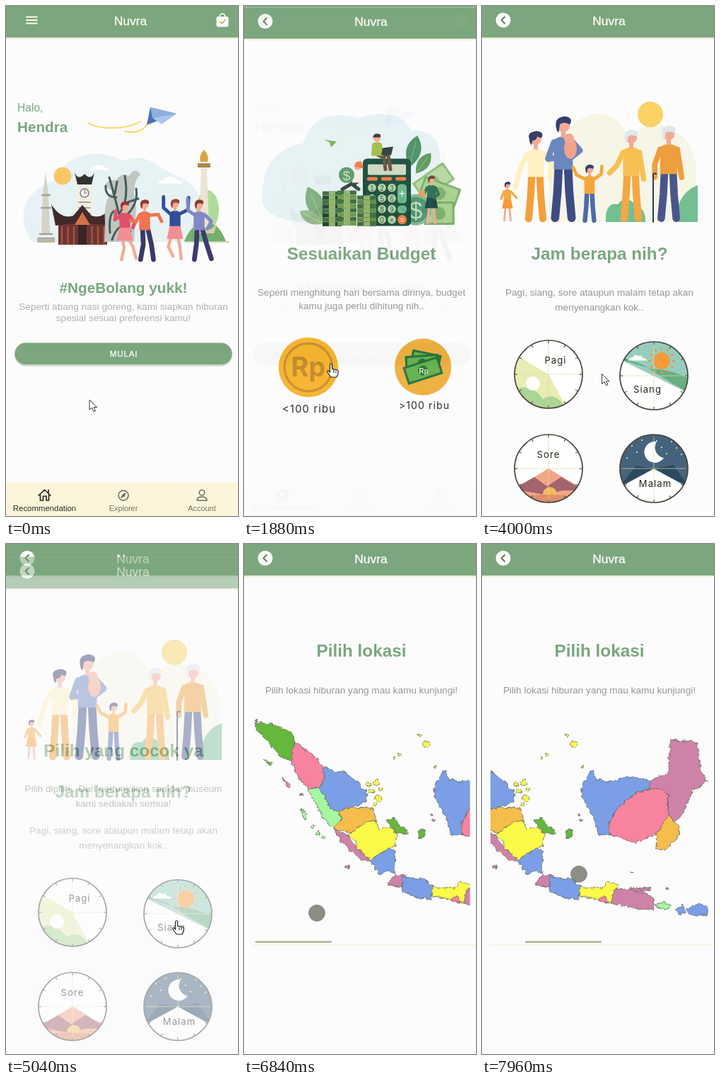
These frames come from a looping animation (328 by 720 pixels, 8 s). An HTML page:

```html
<!DOCTYPE html>
<html lang="id">
<head>
<meta charset="utf-8">
<title>Nuvra</title>
<style>
html, body { margin: 0; height: 100%; overflow: hidden; background: #fcfcfd; }
svg { display: block; width: 100vw; height: 100vh; }
text { font-family: "Liberation Sans", Arial, sans-serif; }
.label { font-family: Inter, sans-serif; font-weight: 400; letter-spacing: 1.1px; }
</style>
</head>
<body>
<svg id="stage" viewBox="0 0 328 720"></svg>
<script>
const LOOP = 8000, SLIDE = 280;
const GREEN = '#7ba67e', MUTED = '#959591', SKIN = '#f3aa94', NAVY = '#38396a', PALE = '#e7f2f4';

// Drawing helpers
const path = (d, fill, more = '') => `<path d="${d}" fill="${fill}" ${more}/>`;
const line = (d, color, w = 1) =>
  `<path d="${d}" fill="none" stroke="${color}" stroke-width="${w}" stroke-linecap="round" stroke-linejoin="round"/>`;
const circ = (x, y, r, fill, more = '') => `<circle cx="${x}" cy="${y}" r="${r}" fill="${fill}" ${more}/>`;
const ell = (x, y, rx, ry, fill) => `<ellipse cx="${x}" cy="${y}" rx="${rx}" ry="${ry}" fill="${fill}"/>`;
const rect = (x, y, w, h, fill, rx = 0) => `<rect x="${x}" y="${y}" width="${w}" height="${h}" rx="${rx}" fill="${fill}"/>`;
const text = (x, y, s, size, fill, more = 'text-anchor="middle"') =>
  `<text x="${x}" y="${y}" font-size="${size}" fill="${fill}" ${more}>${s}</text>`;
const at = (x, y, body, more = '') => `<g transform="translate(${x} ${y}) ${more}">${body}</g>`;
const rough = body => `<g filter="url(#rough)">${body}</g>`;
const repeat = (n, f) => Array.from({ length: n }, (_, i) => f(i)).join('');
const label = (x, y, s, size) => text(x, y, s, size, '#25251c', 'class="label" text-anchor="middle"');
const title = (y, s, size = 24.3) => text(166, y, s, size, GREEN, 'text-anchor="middle" font-weight="700"');
const note = (y, a, b, color = MUTED, gap = 20.5) => text(166, y, a, 13.6, color) + (b ? text(166, y + gap, b, 13.6, color) : '');
const leaf = (x, y, len, angle, fill) =>
  at(x, y, path(`M0 0Q${-len * .45} ${-len * .55} 0 ${-len}Q${len * .45} ${-len * .55} 0 0`, fill)
    + line(`M0 0V${-len * .8}`, '#ffffff60', .8), `rotate(${angle})`);
const cloud = (x, y, s = 1) => at(x, y, path('M-18 5Q-17-1-10-1Q-5-9 2-4Q9-6 11 0Q18 0 19 5Z', '#fff'), `scale(${s})`);
const bill = (x, y, w, h, angle, edge, face) => at(x, y,
  rect(-w / 2, -h / 2, w, h, edge, 1) + rect(-w / 2 + 3, -h / 2 + 3, w - 6, h - 6, face, 2)
  + circ(0, 0, h * .27, edge), `rotate(${angle})`);

// Head is at the origin, feet are 80 units below.
const person = (x, y, s, o) => at(x, y,
  line(o.stance || 'M-4 36L-5 56L-7 78M4 36L5 56L7 78', o.skirt ? SKIN : o.legs, o.skirt ? 4.5 : 7)
  + path('M-8 12Q0 6 8 12L8 37H-8Z', o.top)
  + (o.skirt ? path('M-8 32H8L12 51H-12Z', o.skirt) : '')
  + line(o.arms || 'M-8 14L-13 26L-9 37M8 14L13 26L9 37', o.top, 5)
  + rect(-2, 4, 4, 6, SKIN) + circ(0, 0, 5.5, SKIN) + path('M-5.500 4Q-9-7 1-8Q9-7 5.500-1Q0-4-3-1L-4 6Z', o.hair), `scale(${s})`);

const header = (x, icons) => rect(0, 0, 328, 47, '#f5f1de') + rect(0, 0, 328, 44.5, GREEN)
  + text(x, 26.5, 'Nuvra', 17.4, '#fffdf6', 'text-anchor="middle" stroke="#fffdf6" stroke-width=".3"') + icons;
const backHeader = header(179.5, circ(30, 20, 10.5, '#fdfdf9') + line('M32 15.5L27.5 20L32 24.5', '#5d7b5c', 2));
const page = (id, body) => `<g id="${id}">${rect(0, 0, 328, 760, '#fcfcfd')}${body}</g>`;

const home = () => {
  const art = path('M27 315C18 280 35 258 72 245C82 207 135 200 165 219C200 203 217 232 245 241C280 255 282 300 300 333H36Z', PALE)
    + cloud(232, 246, .9) + cloud(132, 228, .7) + circ(80, 240, 12.5, '#fbc667')
    + path('M56 235L60 265L62 322H50L52 265Z', '#d4d3c6') + line('M51 267h11M50 285h13M48 322h17M46 328h22', '#a3a296', 2.5) + rect(44, 328, 25, 6, '#b9b8a8')
    + rect(99, 250, 24, 62, '#f1eee4') + circ(111, 264, 6, '#fff', 'stroke="#777" stroke-width="1.500"')
    + line('M111 260v4h3M103 277h16M103 285h16M103 293h16', '#8b8b82', 1.5) + path('M97 235Q102 247 111 237Q120 247 125 235L121 252H101Z', '#33342f')
    + path('M74 305H143V337H74Z', '#6b3532') + line(repeat(8, i => `M${79 + i * 8.5} 312v24`), '#a6523c', 2.5)
    + path('M64 280Q78 302 95 296L108 281L121 296Q138 302 151 280L147 310Q108 303 70 310Z', '#43292b') + path('M97 309L108 291L119 309Z', '#d2704a')
    + rect(102, 309, 12, 28, '#3a2425')
    + path('M140 305Q138 270 152 262L140 254Q142 244 156 246Q163 234 174 240Q182 226 190 238Q176 250 184 285L181 333H139Z', '#c0c7c1')
    + line('M166 320Q157 280 146 242M161 292Q174 275 168 240M163 302Q188 283 184 258M156 270Q140 270 141 254M172 277L187 272M154 265L157 248M147 320Q145 295 152 290M150 330Q160 300 176 318', '#465c5c', 3)
    + ell(285, 288, 16, 28, '#b0dc9b') + path('M252 333Q262 306 277 310Q299 299 311 333Z', '#72b06c')
    + path('M276 229H284L287 313H273Z', '#eae4d2') + path('M263 308L271 315H290L298 308L294 321H268Z', '#d8cbb0')
    + rect(271, 222, 18, 6, '#a98850', 1) + path('M275 220Q272 211 280 203Q288 212 285 220Z', '#dda341') + line('M255 333H315', '#c9d2b8', 2)
    + person(168, 283, .94, { hair: '#9c3440', top: '#e2506a', skirt: '#f28e94', arms: 'M-7 14L-15 20L-13 6M7 14L15 25L12 32', stance: 'M-4 46L-1 62L-5 80M4 46L12 60L17 78' })
    + person(196, 281, .96, { hair: '#8e352e', top: '#f0744f', legs: NAVY, arms: 'M-7 14L-13 25L-21 22M8 15L20 14L25 24', stance: 'M-3 36L-2 58L-6 80M5 36L10 58L13 80' })
    + person(239, 280, .96, { hair: '#9c4434', top: '#334d9a', skirt: '#f28e94', arms: 'M-7 14L-17 5L-17-11M7 14L19 8L20-10', stance: 'M-5 46L-10 62L-3 76M4 46L7 62L9 80' })
    + person(273, 281, .96, { hair: '#8b3c33', top: '#8089c6', legs: '#3d3b70', arms: 'M-7 14L-16 8L-17-9M8 14L18 24L12 35', stance: 'M-3 36L-4 58L-7 80M5 36L11 57L18 79' });
  const plane = line('M116 165C130 174 168 176 190 163M168 177Q190 181 199 168', '#f7d567', 2)
    + path('M204 143L241 152L199 168Z', '#4d70b0') + path('M204 143L241 152L207 158Z', '#8db0e0') + path('M207 158L241 152L220 167Z', '#a9c6ec');
  const tabs = rect(0, 672.5, 328, 88, '#fdf5da')
    + line('M46 691L54.5 683L63 691M48.500 690V698H52.500V692H57V698H60.500V690M60 687v-4', '#292926', 1.7)
    + circ(166, 691, 7, 'none', 'stroke="#6c6a5e" stroke-width="1.500"') + path('M170 687L167.500 692.500L162 695L164.500 689.500Z', '#6c6a5e')
    + circ(277, 687, 3.8, 'none', 'stroke="#6c6a5e" stroke-width="1.500"') + line('M270 698Q270 693 277 693Q284 693 284 698Z', '#6c6a5e', 1.5)
    + text(54.5, 713, 'Recommendation', 11.4, '#292926') + text(166, 713, 'Explorer', 10.9, '#737064') + text(277, 713, 'Account', 10.9, '#737064');
  return page('home', header(176, line('M29 15.500H44M29 20H44M29 24.500H44', '#fffae6', 1.8)
      + rect(297.5, 15, 17, 14.5, '#fffef8', 2) + line('M302 16Q302 11 306 11Q310 11 310 16', '#fffef8', 1.6) + line('M302.500 22L305 24.500L310 19.500', '#c2a86a', 1.6))
    + text(16, 149, 'Halo,', 15.6, GREEN, '') + text(16, 178, 'Hendra', 20.7, GREEN, 'font-weight="700"')
    + plane + art + title(405, '#NgeBolang yukk!', 20.75)
    + note(429, 'Seperti abang nasi goreng, kami siapkan hiburan', 'spesial sesuai preferensi kamu!', '#b1b2ab', 15.5)
    + rect(12, 476, 308, 32.5, '#cfd3c6', 16) + rect(12.5, 475.5, 307, 30.5, GREEN, 15.3)
    + text(166.5, 495, 'MULAI', 11.6, '#fffdf4', 'text-anchor="middle" letter-spacing=".8" stroke="#fffdf4" stroke-width=".3"') + tabs);
};

const budget = () => {
  const keys = ['123', '456', '789', '0×'];
  const pad = keys.map((row, r) => [...row].map((k, c) => circ(181 + c * 14 + (r > 2 ? 14 : 0), 255 + r * 15, 5.8, '#b5d3a8')
    + text(181 + c * 14 + (r > 2 ? 14 : 0), 259 + r * 15, k, 10, '#245c4a')).join('')).join('');
  const stack = (x, y, n, color) => repeat(n, i => rect(x, y + i * 6.2, 27, 5.9, i % 2 ? color : '#3c7041') + rect(x + 9, y + i * 6.2, 9, 5.9, '#93b56c'));
  const art = path('M75 303Q20 295 26 265C27 220 47 200 84 192C95 150 132 148 162 157C185 148 225 146 236 174C278 175 279 200 276 226L300 303Z', PALE)
    + path('M113 187L131 190L123 198L121 191Z', '#7cae55')
    + leaf(234, 226, 46, 14, '#4c8f63') + leaf(243, 235, 36, 36, '#5c9a5c')
    + leaf(112, 303, 54, -24, '#7fae7d') + leaf(112, 306, 38, -62, '#96bb8e')
    + bill(268, 246, 53, 30, -35, '#8fbf7b', '#b9d8a0') + bill(276, 263, 55, 33, 20, '#79b06d', '#a9d08e') + bill(276, 291, 43, 33, 0, '#79b06d', '#a9d08e')
    + circ(243, 286, 22, '#86b795') + circ(243, 286, 18, '#4f9570') + text(243, 298, '$', 34, '#c4dfbc')
    + rect(168, 214, 68, 95, '#1b4d3c', 6) + rect(175, 222, 54, 15, '#d0d9bf', 2)
    + rect(174, 240, 15, 5, '#f07d46', 2) + rect(194, 240, 15, 5, '#f07d46', 2) + rect(214, 240, 15, 5, '#f07d46', 2) + pad
    + rect(217, 250, 13, 27, '#6bb789', 5) + text(223.5, 268, '+', 16, '#fff') + rect(217, 280, 13, 11, '#6bb789', 5) + circ(223.5, 300, 6.5, '#f07d46') + text(223.5, 304, '=', 11, '#fff')
    + stack(111, 260, 8, '#23462f') + stack(160, 266, 7, '#5d8c48') + stack(132, 259, 8, '#6d9a4c')
    + line('M188 206L204 210L207 229M186 207L198 213L200 229', '#695240', 5) + path('M181 193Q188 188 195 193L197 210H180Z', '#a3bd4a')
    + circ(188, 185, 5, SKIN) + path('M182 184Q184 176 193 180V184Z', '#40362f') + path('M196 199L211 197L208 209H194Z', '#294038')
    + line('M156 246L151 250L139 257M161 246L154 251L162 257', '#394540', 5) + path('M154 229H167V248H153Z', '#f5efe6') + circ(161, 225, 5, SKIN) + path('M156 225Q157 216 166 218L169 228Z', '#f07d46')
    + circ(145, 237, 11, '#5c9a6c') + text(145, 244, '$', 19, '#d1e4bb')
    + person(265, 244, .78, { hair: '#693f3c', top: '#2d6e55', skirt: '#1c4a40', arms: 'M-8 14L-14 26L-18 22M8 14L13 26L4 32' })
    + rect(247, 259, 9, 9, '#e99b58', 1);
  const coin = circ(0, 0, 40, '#f6b32b') + circ(0, 0, 32, 'none', 'stroke="#c98f2a" stroke-width="3"')
    + text(0, 12, 'Rp', 36, '#c48a28', 'text-anchor="middle" font-weight="700" style="font-family:Inter,sans-serif"') + label(1, 61, '&lt;100 ribu', 14);
  const cash = circ(253, 508, 40, '#eeae3c') + bill(257, 497, 42, 20, 12, '#23713a', '#63b04f') + bill(252, 502, 48, 22, -4, '#23713a', '#63b04f') + bill(253, 513, 52, 26, -18, '#23713a', '#63b04f')
    + text(254, 517, 'Rp', 10, '#dcecae', 'text-anchor="middle" font-weight="700"') + label(255, 567.5, '&gt;100 ribu', 14);
  return page('budget', backHeader + art + title(356.5, 'Sesuaikan Budget')
    + note(407, 'Seperti menghitung hari bersama dirinya, budget', 'kamu juga perlu dihitung nih..', MUTED, 19.5)
    + at(91, 508.5, coin, 'scale(1.055)') + cash);
};

const hours = () => {
  const art = path('M96 305C85 215 120 150 168 152Q202 157 206 196C224 148 300 165 303 230V305Z', '#f6f5e6') + circ(238, 153, 18, '#fbd264')
    + path('M175 305Q174 276 192 280Q204 264 219 283Q231 285 231 305ZM273 305Q276 263 305 253V305Z', '#74bf92')
    + person(36, 253, .64, { hair: '#3b3d63', top: '#f5a945', skirt: '#f49c3a', arms: 'M-8 14L-14 30M8 14L20 28' })
    + person(76, 188, 1.44, { hair: '#393d66', top: '#fff0c2', legs: '#f3a03c', arms: 'M-8 14L-15 28L-20 47M8 14L15 25L14 38' }) + circ(72, 184, 6, '#393d66')
    + person(115, 169, 1.67, { hair: '#343e6d', top: '#6c86c0', legs: '#3e4c85', arms: 'M-8 14L-13 28L4 26M8 14L14 21L5 28' })
    + ell(125, 201, 9, 15, '#f2a28a') + circ(123, 187, 7, SKIN)
    + person(152, 231, .92, { hair: '#39416f', top: '#f4a73c', legs: '#5068ab', arms: 'M-8 14L-20 8L-25-3M8 14L18 7L19-5' })
    + person(211, 186, 1.46, { hair: '#dde9ec', top: '#f7c055', legs: '#f4a845', arms: 'M-8 14L-14 27L-21 34M8 14L12 40' })
    + person(264, 181, 1.52, { hair: '#e1e8ec', top: '#ed9f3c', legs: '#48568c', arms: 'M-8 14L-13 28L-13 40M8 14L12 40' }) + line('M242 305V239Q242 235 246 237', '#303a58', 2);
  const clock = (x, y, name, tx, ty, scene) => at(x, y, circ(0, 0, 48, '#fff') + `<g clip-path="url(#dial)">${scene}</g>`
    + line('M-48 0H48M0-48V48', '#dcdca6', .7) + circ(0, 0, 48, 'none', 'stroke="#45453a" stroke-width="1.700"')
    + repeat(12, i => `<path d="M0-48V-44" stroke="#55554a" stroke-width="1.200" transform="rotate(${i * 30})"/>`) + label(tx, ty, name, 13));
  const rays = (x, y) => at(x, y, repeat(12, i => `<path d="M0-15V-19" stroke="#ee9435" stroke-width="2" transform="rotate(${i * 30})"/>`) + circ(0, 0, 12, '#f69a3c'));
  const morning = path('M-50-30L0 0L27 50H-50Z', '#e9edb4') + path('M-50 23Q-25 10-8 35Q10 22 26 50H-50Z', '#abd593') + circ(-22, 13, 10, '#fff');
  const noon = path('M-50-24L50 25V-50H-50Z', '#98cdbd') + path('M-50-24Q-20-22 0-5L50 25V4Q20-10-5-10Z', '#6aae82') + cloud(-23, -25, .7) + rays(11, -21);
  const dusk = path('M-50 30L0 0L50 30V50H-50Z', '#f2a688') + path('M-50 29L-20 12L-2 25L18 12L50 31L20 31L-5 37Z', '#a3646c') + circ(2, 36, 10, '#f7b95e') + path('M-50 43Q0 30 50 44V50H-50Z', '#df8f6a');
  const night = path('M-50 27L0 0L50 27V-50H-50Z', '#46637d') + path('M4-38A15 15 0 1 0 14-15A15 15 0 0 1 4-38Z', '#fff')
    + repeat(12, i => circ(-38 + i * 7, -15 - i * 17 % 26, .9, '#fff')) + path('M-50 27L-25-4L0 0L28-5L50 27L0 0Z', '#2a4a60');
  return page('hours', backHeader + art + title(358, 'Jam berapa nih?')
    + note(409, 'Pagi, siang, sore ataupun malam tetap akan', 'menyenangkan kok..')
    + clock(94, 520, 'Pagi', 10, -15, morning) + clock(243, 522, 'Siang', -9, 24, noon)
    + clock(94, 653, 'Sore', 0, -15, dusk) + clock(243, 653, 'Malam', 2, 26, night));
};

const choice = () => {
  const pin = (x, y) => path(`M${x} ${y + 6}L${x - 4} ${y}A4 4 0 1 1 ${x + 4} ${y}Z`, '#d9523b') + circ(x, y - 2, 1.5, '#fff');
  const islands = rough([
    'M22 182L36 183L59 190L75 201L89 206L95 222L77 218L55 207L43 195Z',
    'M97 156L109 158L121 141L136 147L132 163L137 170L129 184L121 197L106 191L96 174Z',
    'M87 220L110 222L137 229L135 234L91 227ZM155 159Q164 151 186 153L176 159L161 164L164 175L182 172L172 181L178 192L168 188L162 182L157 200L152 190L156 177L149 171Z',
    'M172 220L188 217L196 222ZM190 140L197 147L193 157ZM188 173L203 169L206 176Z'
  ].map(d => path(d, '#cbdc24')).join(''));
  const plane = at(141, 235, path('M-4-20Q2-30 6-19L5 0L33 1L31 8L4 13L-1 28L8 35L5 39L-6 34L-18 36L-19 31L-9 26L-9 10L-39-11L-35-17L-8-3Z', '#cccac2') + path('M-5-18Q1-25 5-17L3-12H-4Z', '#56594f'), 'rotate(16)');
  const woman = path('M202 162Q202 144 221 143L249 146Q264 147 263 168L261 211Q267 213 264 238L260 258H200Q192 232 197 213L207 210Z', '#4c63b4')
    + path('M210 178Q208 151 231 151L246 155Q255 185 251 223H211Z', '#6a80d2')
    + rect(195, 212, 14, 42, '#6a80d2', 6) + rect(250, 212, 15, 42, '#6a80d2', 6) + line('M204 259v5M257 259v5', '#85684b', 3)
    + line('M215 243Q207 258 211 298M226 244Q220 265 222 299', '#f3a3a8', 10) + path('M202 303Q209 296 215 301L209 306ZM215 303L225 297L226 304L219 306Z', '#2f4f80')
    + path('M207 224L247 218Q252 240 234 248H208Q201 236 207 224Z', '#453a68')
    + path('M213 180Q230 168 252 180L247 222L214 222Z', '#3a3d57')
    + path('M220 178Q213 149 233 148Q254 150 252 178L240 182L233 168Z', '#ee8240') + path('M229 168H237L239 180H228Z', SKIN) + ell(232, 163, 6.5, 8, SKIN) + path('M225 160Q228 150 240 155Q240 160 236 159Z', '#ee8240')
    + line('M214 186L207 207L224 204L233 194M250 187L246 206L230 210L222 200', SKIN, 5) + line('M214 184L211 194M250 184L249 194', '#3a3d57', 6);
  const pagoda = repeat(8, i => path(`M${123 - 5 - i * 1.9} ${477 + i * 10}Q123 ${465 + i * 10} ${128 + i * 1.9} ${477 + i * 10}Z`, '#3b3533') + rect(120 - i, 476 + i * 10, 6 + i * 2, 7, '#6f5c4a'))
    + line('M123 464v9', '#3b3533', 2);
  const barong = path('M51 523Q60 512 72 519L84 505L93 517Q112 512 113 537L106 551L111 567H101L94 552L80 553L73 570H59L63 551Q48 541 51 523Z', '#d9b56e')
    + line(repeat(9, i => `M${66 + i * 5} ${522 + i % 3 * 3}q-3 13-1 25`), '#f3e2b4', 2) + path('M54 526L74 520L78 538L66 546L56 539Z', '#6b4030') + path('M50 518L60 506L74 514L70 522Z', '#c98a2f');
  const show = circ(98, 523, 45, '#f8ad3b') + cloud(84, 497, .8) + pagoda + rough(barong)
    + circ(61, 529, 2.5, '#fff3cf') + circ(71, 527, 2.5, '#fff3cf') + line('M62 538L72 536', '#d8443c', 3)
    + circ(122, 539, 6, '#272a28') + path('M114 546L129 544L132 568H109Z', '#272a28') + label(98, 588.5, 'Pertunjukan', 12.3);
  const gate = 'M214 557V508L221 493L232 478L238 505V557ZM294 557V508L287 493L276 478L270 505V557Z';
  const dancer = (x, top, legs, hair) => person(x, 509, .7, { hair, top, legs, stance: 'M-3 38L-3 76M3 38L4 76' }) + rect(x - 6, 530, 12, 4, '#d98c34');
  const shop = circ(254, 512, 44, '#cf8560') + path(gate, '#dcb0a0') + path('M203 557H305V552H293V547H215V552H203Z', '#d6c3bd')
    + dancer(225, '#fff7ec', '#e0a45c', '#4a302b') + dancer(245, '#fff', '#f3e8dc', '#f7f0e6') + dancer(264, '#fff', '#f3e8dc', '#f7f0e6') + dancer(282, '#ee9a4c', '#8fae5c', '#4a302b') + label(254, 584.5, 'Workshop', 11.2);
  const museum = `<g clip-path="url(#dome)">${circ(175, 663, 51, '#f6c768')}</g>` + rect(126, 665, 98, 28, '#ece6d2') + rect(160, 654, 30, 14, '#ece6d2')
    + path('M125 667L129 659H153L157 667ZM193 667L197 659H221L225 667Z', '#3f5a80') + path('M157 656L165 647H185L193 656Z', '#34507a') + path('M169 647L175 635L181 647Z', '#34507a')
    + path('M126 662L131 649L136 662ZM214 662L219 649L224 662Z', '#34507a') + line('M175 636v-7', '#34507a', 1.5)
    + repeat(13, i => rect(129 + i * 7.3, 670, 4, 8, '#4a6180', 2) + rect(129 + i * 7.3, 682, 4, 11, '#4a6180', 2)) + rect(170, 678, 10, 16, '#34507a', 5) + label(176, 714.5, 'Museum', 12.4);
  return page('choice', backHeader + `<g id="choiceArt">`
    + path('M48 290Q29 288 33 260V215C40 180 80 190 104 153C125 121 171 119 196 151C229 130 309 136 307 177V270Q307 289 279 289Z', PALE)
    + cloud(59, 255, 1.3) + cloud(288, 192, .8) + cloud(166, 274, .8) + islands + line('M127 190Q137 202 140 215Q146 188 164 184', '#f0f2e2', 1.5) + pin(127, 184) + pin(164, 180) + plane + woman
    + show + shop + museum + '</g>'
    + `<g id="choiceText">${title(354, 'Pilih yang cocok ya')}${note(404, 'Pilih dipilih.. Dari pertunjukan sampai museum', 'kami sediakan semua!')}</g>`);
};

const place = () => {
  const BLUE = '#7a9fe6', PINK = '#f7839f', MAUVE = '#cf82a8', LIME = '#a6f7a1', YELLOW = '#fafa49', AMBER = '#f5bd4c', LEAF = '#65b83b';
  const area = (color, d) => path(`M${d}Z`, color);
  const isles = (color, spots) => spots.map(([x, y, r]) => ell(x, y, r * 1.2, r, color)).join('');
  const sumatra = area(LEAF, '15 252L45 255L68 267L73 283L66 306L52 301L35 279L18 263')
    + area(PINK, '72 279L103 303L112 315L113 330L108 343L92 346L78 332L66 305')
    + area(BLUE, '112 313L125 321L142 322L160 336L174 351L173 364L150 372L133 379L122 372L106 348L113 334')
    + area(LIME, '90 346L106 344L122 372L133 378L138 391L127 401L112 388L101 365')
    + area(AMBER, '133 378L150 372L182 373L187 390L173 393L151 408L126 400L138 389')
    + area(MAUVE, '126 400L146 411L160 430L179 444L177 449L162 443L138 420')
    + area(YELLOW, '146 411L174 392L187 390L190 402L207 400L217 411L213 426L192 437L179 446L160 430L158 419')
    + area(BLUE, '178 446L205 429L214 434L213 466L203 460L192 467');
  const java = area(MAUVE, '203 481L213 467L229 469L223 484')
    + area(BLUE, '224 470L255 473L268 484L264 501L245 500L223 490')
    + area(YELLOW, '267 485L298 486L306 476L320 481L316 495L311 508L292 501L266 498')
    + area(PINK, '291 502L300 497L307 507') + area(MAUVE, '316 486L350 489L370 499L372 517L343 514L311 507') + area(MAUVE, '338 485L366 486L364 490L338 490')
    + area(LIME, '372 509L385 506L397 511L386 517') + area(BLUE, '402 516L412 509L415 521L405 523') + area(BLUE, '416 516L432 508L447 512L447 523L424 525');
  const borneo = area(BLUE, '269 344L282 319L290 332L306 336L336 328L368 334L367 345L345 352L320 372L308 393L310 409L294 412L288 391L270 360')
    + area(PINK, '308 393L320 372L345 352L362 346L378 344L391 354L393 384L375 409L345 422L308 410')
    + area(AMBER, '392 384L408 400L404 414L389 432L374 431L375 409')
    + area(MAUVE, '395 276L432 280L437 320L447 335L427 347L408 388L399 392L392 383L391 354L378 344L363 347L367 334L391 322');
  const small = area(LEAF, '202 391L214 386L221 399L232 404L229 410L214 407') + area(LEAF, '246 406L256 403L257 413L248 415')
    + area(LEAF, '27 304L40 310L38 314') + area(PINK, '54 330L66 340L62 345') + area(LIME, '80 373L89 383L86 391') + isles(LIME, [[97, 398, 2], [105, 408, 3], [112, 414, 2]])
    + isles(YELLOW, [[257, 283, 4], [220, 298, 2], [211, 302, 1.5], [248, 270, 1.5], [270, 314, 1.5], [176, 339, 3], [187, 337, 4], [193, 346, 2], [180, 349, 3], [190, 359, 4], [186, 367, 2]])
    + isles(MAUVE, [[146, 456, 2], [81, 354, 2], [18, 249, 1.5], [265, 382, 2], [268, 390, 1.5], [340, 463, 1], [390, 486, 2]]);
  return page('place', backHeader + title(159, 'Pilih lokasi') + note(210.5, 'Pilih lokasi hiburan yang mau kamu kunjungi!')
    + `<g clip-path="url(#mapView)"><g id="map" filter="url(#rough)" stroke="#5d6158" stroke-width=".8">${sumatra + java + borneo + small}</g></g>`
    + line('M12 566H328', '#f5f3dd', 1.5) + '<rect id="bar" x="16" y="560.5" width="108" height="2.500" rx="1" fill="#b4b28c"/>');
};

const cursor = `<g id="cursor">
  <g id="arrow">${path('M0 0V14L3.500 11L6 16.500L8.500 15.300L6 10.500H10.500Z', '#fff', 'stroke="#35352c"')}</g>
  <g id="hand">${path('M-1.500 1Q0-1.500 1.500 1V7L9 9Q11 10 10 14L8 19H0L-5 12Q-6 9-3.500 10L-1.500 12Z', '#fff', 'stroke="#25251c" stroke-width="1.200"')}${line('M4 9v4M7 10v3', '#25251c')}</g>
  <g id="touch">${circ(0, 0, 11.5, '#555346', 'fill-opacity=".65" stroke="#77756a" stroke-opacity=".6"')}</g></g>`;

const stage = document.getElementById('stage');
stage.innerHTML = `<defs>
  <clipPath id="dial"><circle r="48"/></clipPath>
  <clipPath id="dome"><rect x="120" y="605" width="110" height="88"/></clipPath>
  <clipPath id="mapView"><rect x="12" y="235" width="307.500" height="310"/></clipPath>
  <filter id="rough" color-interpolation-filters="sRGB">
    <feTurbulence type="fractalNoise" baseFrequency=".17" numOctaves="2" seed="4"/>
    <feDisplacementMap in="SourceGraphic" scale="7" xChannelSelector="R" yChannelSelector="G"/>
  </filter></defs>` + home() + budget() + hours() + choice() + place() + cursor;

// Motion
const $ = id => document.getElementById(id);
const show = (id, on) => $(id).setAttribute('display', on ? 'inline' : 'none');
const pages = [['home', -SLIDE], ['budget', 1723], ['hours', 3560], ['choice', 4984], ['place', 6200]];
const pointer = [[0, 118, 556], [300, 118, 556], [900, 123, 494], [1680, 123, 494], [1850, 123, 505], [3250, 122, 511], [3700, 122, 511],
  [4400, 242, 532], [5700, 240, 532], [6200, 240, 532], [6700, 103, 521], [6860, 103, 521], [7200, 43, 500], [7520, 205, 466], [7960, 137, 466]];
const scroll = [[0, 0], [6860, 0], [7200, 60], [7520, 60], [7960, 128]];
const presses = [[1560, 1660], [3340, 3480], [4820, 4920], [5980, 6080], [6760, 7200], [7520, 8000]];
const hovers = [[850, 3700], [4200, 6230]];

const within = (ranges, t) => ranges.some(([a, b]) => t >= a && t < b);
const track = (keys, t) => {
  const i = keys.findIndex(k => k[0] > t);
  if (i < 0) return keys.at(-1).slice(1);
  const [a, b] = [keys[i - 1], keys[i]], p = (t - a[0]) / (b[0] - a[0]), e = p * p * (3 - 2 * p);
  return a.slice(1).map((v, k) => v + (b[k + 1] - v) * e);
};

// cubic-bezier(.36, .66, .04, 1)
const slideEase = x => {
  if (x <= 0 || x >= 1) return x <= 0 ? 0 : 1;
  const bez = (u, a, b) => 3 * (1 - u) ** 2 * u * a + 3 * (1 - u) * u * u * b + u ** 3;
  let lo = 0, hi = 1;
  for (let i = 0; i < 24; i++) {
    const mid = (lo + hi) / 2;
    if (bez(mid, .36, .04) < x) lo = mid; else hi = mid;
  }
  return bez(lo, .66, 1);
};

function draw(t) {
  pages.forEach(([id, start], i) => {
    const next = pages[i + 1], p = slideEase((t - start) / SLIDE);
    show(id, t >= start && (!next || t < next[1] + SLIDE));
    $(id).setAttribute('opacity', p);
    $(id).setAttribute('transform', `translate(0 ${40 * (1 - p)})`);
  });
  const loaded = t > 5150;
  show('choiceArt', loaded);
  $('choiceText').setAttribute('transform', `translate(0 ${loaded ? 0 : -72})`);

  const [offset] = track(scroll, t);
  $('map').setAttribute('transform', `translate(${-offset} 0)`);
  $('bar').setAttribute('x', 16 + offset * .351);

  const pressed = within(presses, t), hover = within(hovers, t);
  $('cursor').setAttribute('transform', `translate(${track(pointer, t).join(' ')})`);
  show('touch', pressed);
  show('hand', !pressed && hover);
  show('arrow', !pressed && !hover);
}

const begin = performance.now();
(function tick() {
  draw((performance.now() - begin) % LOOP);
  requestAnimationFrame(tick);
})();
</script>
</body>
</html>
```
